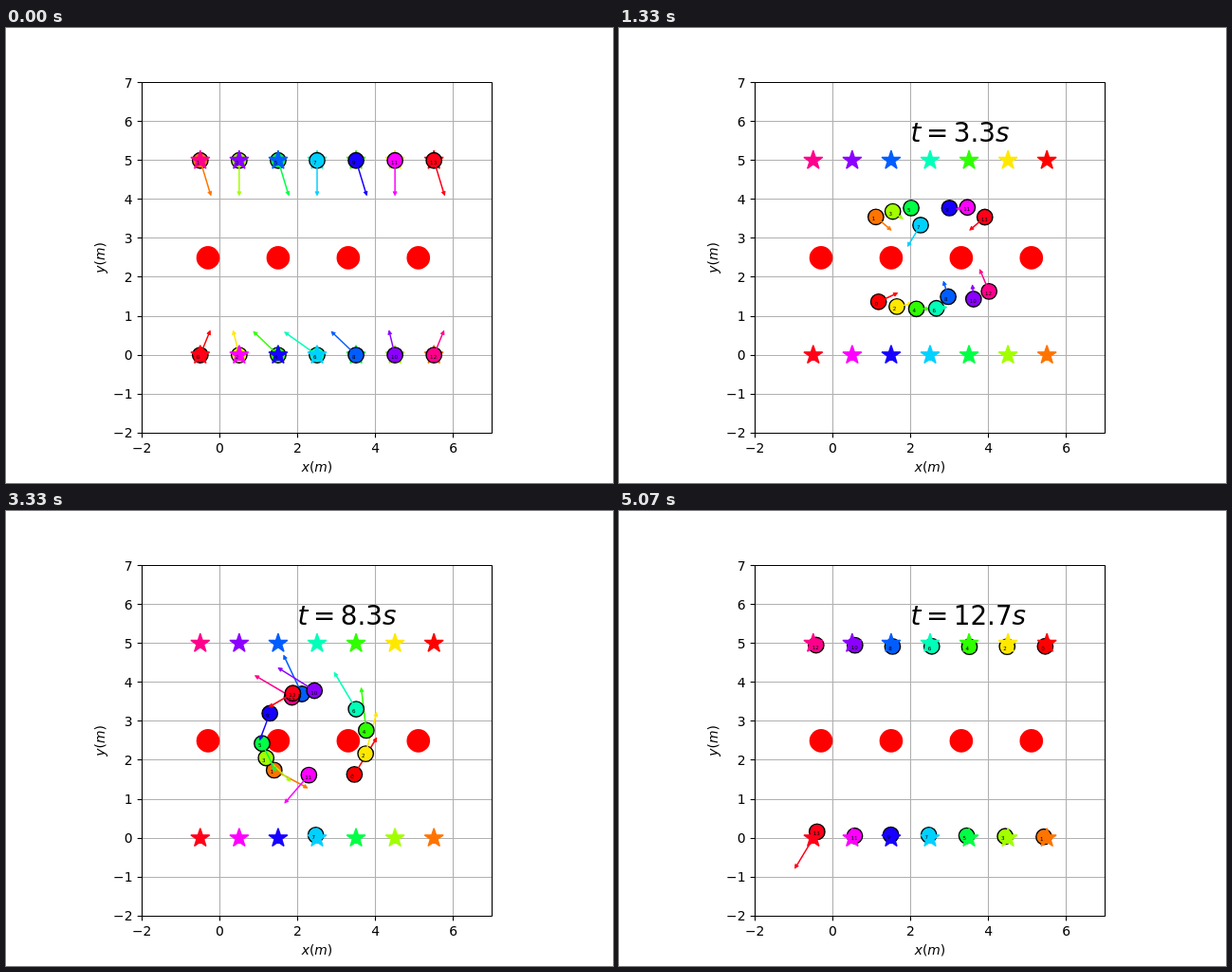
An HTML page with a canvas for the animation above (5.13 s loop, 640 px wide and 480 px high).

```html
<!DOCTYPE html>
<html lang="en">
<head>
<meta charset="utf-8">
<title>Agents swapping sides</title>
<style>
html, body { margin: 0; width: 100%; height: 100%; overflow: hidden; background: #fff; }
canvas { display: block; }
</style>
</head>
<body>
<canvas id="stage" width="640" height="480"></canvas>
<script>
const ctx = document.getElementById('stage').getContext('2d');
const LOOP = 5130, LAST = 127, COUNT = 14;
const UNIT = 369.6 / 9;            // pixels per metre, also top speed per second
const REST = 3.5;                  // distance from the goal at which an agent stops
const HEAD = 4.1;                  // arrow head length
const CX = 328, CY = 242.4, RING = 53;
const px = x => 143.2 + (x + 2) * UNIT;
const py = y => 427.2 - (y + 2) * UNIT;
const snap = v => Math.floor(v) + 0.5;

// Agents that cross the ring: step they leave it, step and place where they head for the goal
const shortcuts = { 7: [21, 66, 305, 290], 8: [21, 83, 312, 193], 11: [46, 88, 306, 292] };

// Both rows close up, turn anticlockwise on a ring, then leave it straight for the goal.
// Steps last 0.1 s; q is the place in the queue, angles are in degrees.
function makeAgent(i) {
  const odd = i % 2, col = i >> 1, q = odd ? 6 - col : col, side = odd ? -1 : 1;
  const goal = { x: px(5.5 - col), y: py(odd ? 0 : 5) };
  const onRing = (k, first, gap) => {
    const a = (first + gap * q) * Math.PI / 180;
    return { k, x: CX + RING * Math.cos(a), y: CY - RING * Math.sin(a) };
  };
  let keys = [
    { k: 0, x: px(col - 0.5), y: py(odd ? 5 : 0) },
    { k: 21, x: CX + 25.2 * (col - 3), y: CY + 59 * side },
    ...(odd
      ? [onRing(46, 40, 18), onRing(66, 80, 16.5), onRing(90 - q, 140, 13)]
      : [onRing(46, -130, 20), onRing(66, -98, 24), onRing(83, -42, 27)])
  ];
  if (shortcuts[i]) {
    const [leave, k, x, y] = shortcuts[i];
    keys = [...keys.filter(key => key.k <= leave), { k, x, y }];
  }
  keys.forEach((key, j) => {
    const a = keys[j - 1], b = keys[j + 1];
    if (!a) {
      key.vx = odd ? 5 + 5 * Math.cos(Math.PI * col) : -10 + 21 * Math.cos(2 * Math.PI * (col + 0.5) / 7);
      key.vy = odd ? 33 : -22;
    } else if (!b) {
      const d = Math.hypot(goal.x - key.x, goal.y - key.y);
      key.vx = (goal.x - key.x) / d * UNIT;
      key.vy = (goal.y - key.y) / d * UNIT;
    } else {
      key.vx = (b.x - a.x) / (b.k - a.k) * 10;
      key.vy = (b.y - a.y) / (b.k - a.k) * 10;
    }
  });
  return { goal, keys, color: `hsl(${i * 27.26} 100% 50%)` };
}
const agents = Array.from({ length: COUNT }, (_, i) => makeAgent(i));

// Hermite position and slope on one axis
function hermite(p, v, q, w, u, T) {
  const a = 2 * (p - q) + (v + w) * T, b = 3 * (q - p) - (2 * v + w) * T;
  return [p + u * (v * T + u * (b + u * a)), v + u * (2 * b + 3 * u * a) / T];
}

function pose({ keys, goal }, k) {
  const end = keys[keys.length - 1];
  if (k >= end.k) {
    const dx = goal.x - end.x, dy = goal.y - end.y, d = Math.hypot(dx, dy);
    const left = Math.max(REST, d - UNIT * (k - end.k) / 10);
    const speed = left > REST ? UNIT : 0;
    return { x: goal.x - dx / d * left, y: goal.y - dy / d * left, vx: dx / d * speed, vy: dy / d * speed };
  }
  const j = keys.findIndex(key => key.k > k), a = keys[j - 1], b = keys[j];
  const T = (b.k - a.k) / 10, u = (k - a.k) / (b.k - a.k);
  const [x, vx] = hermite(a.x, a.vx, b.x, b.vx, u, T);
  const [y, vy] = hermite(a.y, a.vy, b.y, b.vy, u, T);
  const f = Math.min(1, UNIT / Math.hypot(vx, vy));
  return { x, y, vx: vx * f, vy: vy * f };
}

function line(x1, y1, x2, y2) {
  ctx.beginPath();
  ctx.moveTo(x1, y1);
  ctx.lineTo(x2, y2);
  ctx.stroke();
}

function disc(x, y, r, color) {
  ctx.fillStyle = color;
  ctx.beginPath();
  ctx.arc(x, y, r, 0, 2 * Math.PI);
  ctx.fill();
}

function star(x, y, color) {
  ctx.beginPath();
  for (let j = 0; j < 10; j++) {
    const r = j % 2 ? 4 : 10.4, a = j * Math.PI / 5;
    ctx.lineTo(x + r * Math.sin(a), y - r * Math.cos(a));
  }
  ctx.closePath();
  ctx.fillStyle = ctx.strokeStyle = color;
  ctx.lineWidth = 1.39;
  ctx.lineJoin = 'bevel';
  ctx.fill();
  ctx.stroke();
}

function arrow({ x, y, vx, vy }, color) {
  const len = Math.hypot(vx, vy);
  if (len < 0.5) return;
  ctx.save();
  ctx.translate(x, y);
  ctx.rotate(Math.atan2(vy, vx));
  ctx.fillStyle = ctx.strokeStyle = color;
  ctx.lineWidth = 1.5;
  line(0, 0, len, 0);
  ctx.lineWidth = 0.8;
  ctx.beginPath();
  ctx.moveTo(len, -2);
  ctx.lineTo(len + HEAD, 0);
  ctx.lineTo(len, 2);
  ctx.closePath();
  ctx.fill();
  ctx.stroke();
  ctx.restore();
}

const font = (size, italic) => `${italic ? 'oblique ' : ''}${size}px "DejaVu Sans", sans-serif`;

function text(s, x, y, size, align = 'left') {
  ctx.font = font(size);
  ctx.textAlign = align;
  ctx.fillStyle = '#000';
  ctx.fillText(s, x, y);
}

// Math style: letters slanted, other signs upright, '=' with space around it
function math(s, x, y, size, centred) {
  ctx.textAlign = 'left';
  ctx.fillStyle = '#000';
  const parts = s.match(/[a-z]|[^a-z=]+|=/g).map(p => {
    ctx.font = font(size, /[a-z]/.test(p));
    return { p, f: ctx.font, w: ctx.measureText(p).width, gap: p === '=' ? 0.2 * size : 0 };
  });
  if (centred) x -= parts.reduce((sum, part) => sum + part.w + 2 * part.gap, 0) / 2;
  for (const { p, f, w, gap } of parts) {
    ctx.font = f;
    ctx.fillText(p, x + gap, y);
    x += w + 2 * gap;
  }
}

const left = snap(px(-2)), right = snap(px(7)), top_ = snap(py(7)), bottom = snap(py(-2));

function axes() {
  const label = n => String(n).replace('-', '\u2212');
  ctx.lineWidth = 1.11;
  ctx.strokeStyle = '#b0b0b0';
  for (let x = 0; x <= 6; x += 2) line(snap(px(x)), top_, snap(px(x)), bottom);
  for (let y = -1; y <= 6; y++) line(left, snap(py(y)), right, snap(py(y)));
  ctx.strokeStyle = '#000';
  for (let x = -2; x <= 6; x += 2) {
    line(snap(px(x)), bottom, snap(px(x)), bottom + 4.86);
    text(label(x), px(x), 448, 13.89, 'center');
  }
  for (let y = -2; y <= 7; y++) {
    line(left, snap(py(y)), left - 4.86, snap(py(y)));
    text(label(y), 133.5, Math.round(py(y) + 5.2), 13.89, 'right');
  }
  math('x(m)', CX, 468, 13.89, true);
  ctx.save();
  ctx.translate(104, CY);
  ctx.rotate(-Math.PI / 2);
  math('y(m)', 0, 0, 13.89, true);
  ctx.restore();
}

function draw(k) {
  ctx.fillStyle = '#fff';
  ctx.fillRect(0, 0, 640, 480);
  axes();
  for (let j = 0; j < 4; j++) disc(px(1.8 * j - 0.3), py(2.5), 0.3 * UNIT, '#f00');
  const poses = agents.map(a => pose(a, k));
  agents.forEach(({ goal, color }, i) => {
    const p = poses[i];
    disc(p.x, p.y, 0.2 * UNIT, color);
    ctx.strokeStyle = '#000';
    ctx.lineWidth = 1.39;
    ctx.stroke();
    arrow(p, color);
    star(goal.x, goal.y, color);
  });
  ctx.strokeStyle = '#000';
  ctx.lineWidth = 1.11;
  ctx.strokeRect(left, top_, right - left, bottom - top_);
  poses.forEach((p, i) => text(i, p.x - 4.1, p.y + 4.1, 5.56));
  if (k) math(`t=${(k / 10).toFixed(1)}s`, px(2), 120, 27.78);
}

// 25 steps per second shown on a 30 per second clock
function stepAt(ms) {
  const tick = Math.floor(ms * 0.03 + 0.15);
  return Math.min(LAST, Math.floor(tick * 5 / 6 + 0.4));
}

const start = performance.now();
let shown = -1;
function tick() {
  const k = stepAt((performance.now() - start) % LOOP);
  if (k !== shown) draw(shown = k);
  requestAnimationFrame(tick);
}
tick();
</script>
</body>
</html>
```
